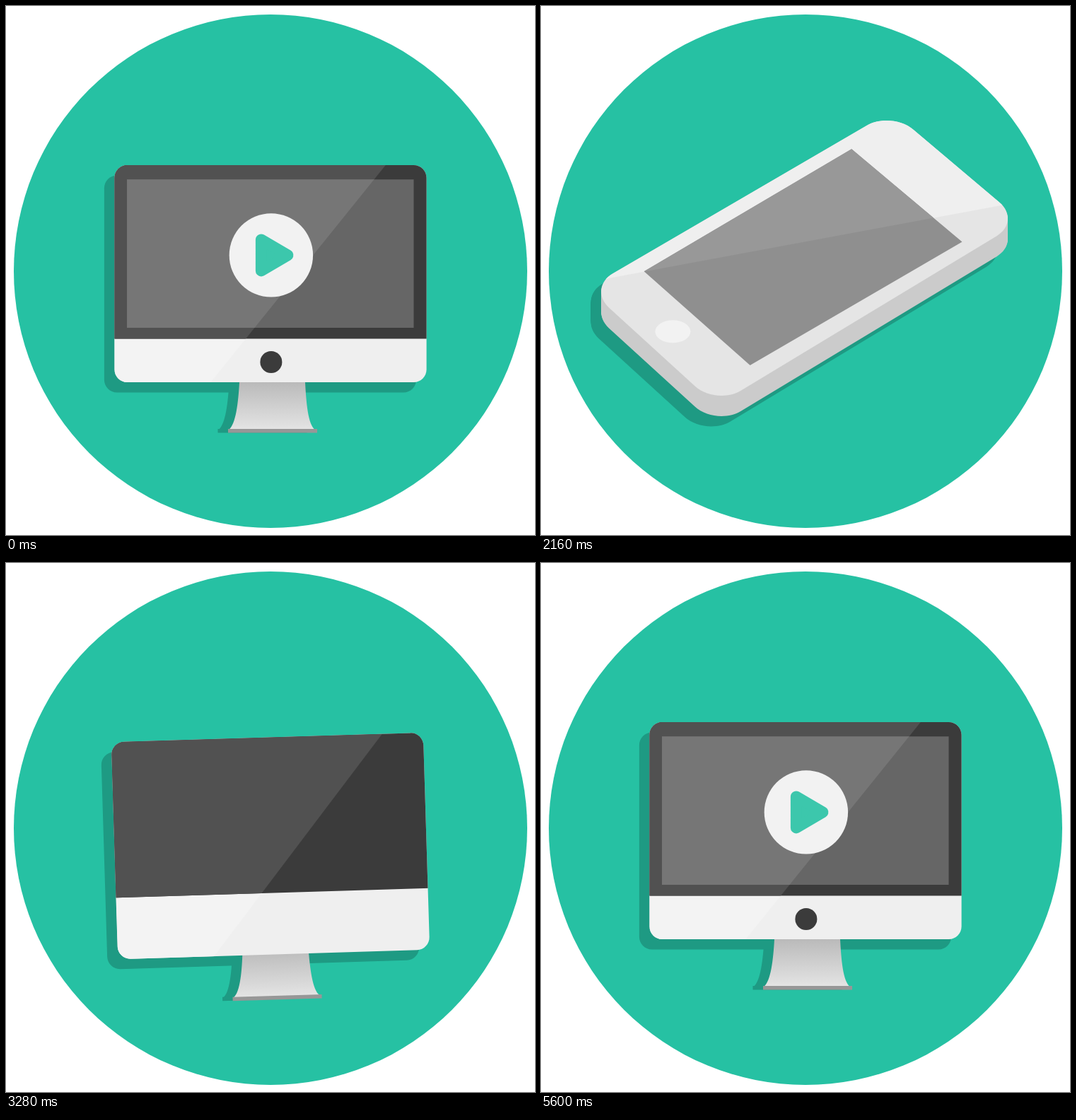
Animation, 748 px wide and 748 px high, one loop 5640 ms. Source, as an HTML page with a canvas:

```html
<!DOCTYPE html>
<html lang="en">
<head>
<meta charset="utf-8">
<title>Monitor and phone</title>
<style>
  html, body { margin: 0; width: 100%; height: 100%; overflow: hidden; background: #fff; }
  canvas { display: block; }
</style>
</head>
<body>
<canvas id="stage" width="748" height="748"></canvas>
<script>
const ctx = document.getElementById('stage').getContext('2d');
const LOOP = 5640, STEP = 40, SHADOW = '#1e9a83', OFFSET = 14.5;

// Timing: an eased ramp, a part that leaves and returns, and a damped swing.
const mix = (a, b, p) => Array.isArray(a) ? a.map((v, i) => mix(v, b[i], p)) : a + (b - a) * p;
const ease = x => x < .5 ? 2 * x * x : 1 - 2 * (1 - x) ** 2;
const ramp = (t, start, length) => ease(Math.min(1, Math.max(0, (t - start) / length)));
const away = (t, leave, back, length) => 1 - ramp(t, leave, length) + ramp(t, back, length);
const spring = x => x < 0 ? 1 : Math.exp(-x / 180) * Math.cos(x * Math.PI / 230);

// Corners in the order of the monitor: top left, top right, bottom right, bottom left.
const PHONE = [[495.5, 148.5], [679.5, 304], [247.7, 565], [66, 399]];
const SLAB = [[485.6, 138.6], [677, 287], [258, 569], [70, 412]];
const LOW = [[490.4, 221.8], [677, 367.5], [241, 631], [63.5, 461.5]];
const HIGH = PHONE.map(([x, y]) => [x, y - 43]);

function monitor(sag) {
  const a = -.0394 * sag, c = Math.cos(a), s = Math.sin(a);
  return [[-1, -1], [1, -1], [1, 1], [-1, 1]].map(([i, j]) => {
    const x = i * 220.6, y = j * 153.5;
    return [374 + x * c - y * s, 378.5 + 27.7 * sag + x * s + y * c];
  });
}

function phone(t) {
  const settled = mix(PHONE, SLAB, spring(t - 1000));
  const crouched = mix(settled, LOW, 1.08 * ramp(t, 2440, 260));
  return mix(crouched, HIGH, ramp(t, 2720, 260));
}

function polygon(points) {
  const p = new Path2D();
  points.forEach(([x, y]) => p.lineTo(x, y));
  p.closePath();
  return p;
}

function rounded(points, cut) {
  const p = new Path2D();
  points.forEach((c, i) => {
    const toward = q => mix(c, q, cut / Math.hypot(q[0] - c[0], q[1] - c[1]));
    const a = toward(points[(i + 3) % 4]), b = toward(points[(i + 1) % 4]);
    p.lineTo(...a);
    p.bezierCurveTo(...mix(a, c, .55), ...mix(b, c, .55), ...b);
  });
  p.closePath();
  return p;
}

function shrink(points, s) {
  const center = mix(mix(points[0], points[2], .5), mix(points[1], points[3], .5), .5);
  return points.map(p => mix(center, p, s));
}

function fill(path, color) {
  ctx.fillStyle = color;
  ctx.fill(path);
}

function ellipse(x, y, rx, ry, color) {
  const p = new Path2D();
  p.ellipse(x, y, rx, ry, 0, 0, 7);
  fill(p, color);
}

function at(x, y, draw, scale = 1, angle = 0) {
  ctx.save();
  ctx.translate(x, y);
  ctx.rotate(angle);
  ctx.scale(scale, scale);
  draw();
  ctx.restore();
}

function clipped(path, draw) {
  ctx.save();
  ctx.clip(path);
  draw();
  ctx.restore();
}

function twoTone(path, glare, dark, light) {
  fill(path, dark);
  clipped(path, () => fill(glare, light));
}

const grey = v => `rgb(${v},${v},${v})`;
const disc = new Path2D();
disc.arc(374, 375, 363, 0, 7);
const leg = new Path2D('M-44 -6V0C-45.500 28-49 60-59 67H63C53 60 50.500 28 49 0V-6Z');
const foot = new Path2D('M-60 66H66V71.500H-60Z');
const triangle = polygon([[-14, -22], [-14, 22], [23.5, 0]]);
const arrow = polygon([[2, 2.5], [37, 16.5], [25.5, 22.5], [42, 40], [36.5, 46], [20, 28], [12.5, 42]]);
const metal = ctx.createLinearGradient(0, 0, 0, 67);
metal.addColorStop(0, '#bababa');
metal.addColorStop(1, '#e4e4e4');

const clickDepth = t => ramp(t, 4800, 100) - ramp(t, 4920, 140);

function drawDevice(t) {
  const m = 1 - away(t, 650, 2980, 320 - 80 * (t > 2000));
  const sag = t < 2000 ? ramp(t, 480, 170) / 2 : spring(t - 3250);
  const quad = mix(monitor(sag), phone(t), m);
  const [a, b, c, d] = quad;
  const point = (u, v) => mix(mix(a, b, u), mix(d, c, u), v);
  const rect = (u0, v0, u1, v1) => [point(u0, v0), point(u1, v0), point(u1, v1), point(u0, v1)];
  const body = rounded(quad, mix(18, 41, m));
  const glare = polygon([a, point(mix(.869, .855, m), 0), point(0, mix(1.55, .95, m))]);
  const depth = Math.round(29 * m);

  const stand = away(t, 480, 3110, 220);
  const atStand = (dx, draw) => {
    const [x, y] = mix(d, c, .5);
    at(x + dx, y, () => {
      ctx.translate(0, (stand - 1) * 72);
      draw();
    }, 1, Math.atan2(c[1] - d[1], c[0] - d[0]));
  };
  if (stand > 0) atStand(-OFFSET, () => {
    fill(leg, SHADOW);
    fill(foot, SHADOW);
  });
  for (let i = 0; i <= depth; i++) at(-OFFSET, OFFSET + i, () => fill(body, SHADOW));
  if (stand > 0) atStand(0, () => {
    fill(leg, metal);
    fill(foot, '#979797');
  });

  for (let i = 1; i <= depth; i++) at(0, i, () => fill(body, '#cbcbcb'));
  twoTone(body, glare, grey(mix(239, 229, m)), grey(mix(243, 239, m)));

  const panel = .8 * away(t, 560, 3060, 285);
  if (panel > 0) clipped(body, () =>
    twoTone(polygon(rect(-.05, -.05, 1.05, panel)), glare, '#3b3b3b', '#515151'));

  const display = away(t, 320, 3440, 220);
  if (display > 0)
    twoTone(polygon(shrink(rect(.04, .066, .959, .749), display)), glare, '#666', '#767676');

  const dot = 15.5 * away(t, 240, 3560, 200);
  ellipse(...point(.502, .907), dot, dot, '#3b3b3b');

  const play = away(t, 240, 3680, 240) * (1 - .08 * clickDepth(t));
  if (play > 0) at(...point(.502, .415), () => {
    ellipse(0, 0, 59.2, 59.2, '#f2f2f2');
    ctx.fillStyle = ctx.strokeStyle = '#3cc7ac';
    ctx.lineWidth = 16;
    ctx.lineJoin = 'round';
    ctx.fill(triangle);
    ctx.stroke(triangle);
  }, play);

  const screen = ramp(t, 1420, 340) - ramp(t, 2820, 180);
  const corners = [point(.079, .165), point(.921, .161), point(.898, .846), point(.084, .85)];
  if (screen > 0) twoTone(polygon(shrink(corners, screen)), glare, '#8f8f8f', '#989898');

  const button = ramp(t, 1600, 240) - ramp(t, 2800, 140);
  ellipse(...point(.485, .925), 25 * button, 16 * button, '#f2f2f2');
}

function drawCursor(t) {
  if (t < 4440) return;
  const arrived = mix([675, 668], [423, 402], ramp(t, 4320, 440));
  const tip = mix(arrived, [510, 800], ramp(t, 5160, 400));
  clipped(disc, () => at(...tip, () => {
    fill(arrow, '#3e3b3f');
    ctx.strokeStyle = '#f2f2f2';
    ctx.lineWidth = 2.6;
    ctx.lineJoin = 'miter';
    ctx.stroke(arrow);
  }, 1 - .12 * clickDepth(t)));
}

function frame() {
  const t = Math.floor(performance.now() % LOOP / STEP) * STEP;
  ctx.clearRect(0, 0, 748, 748);
  fill(disc, '#26c1a3');
  drawDevice(t);
  drawCursor(t);
  requestAnimationFrame(frame);
}
frame();
</script>
</body>
</html>
```
